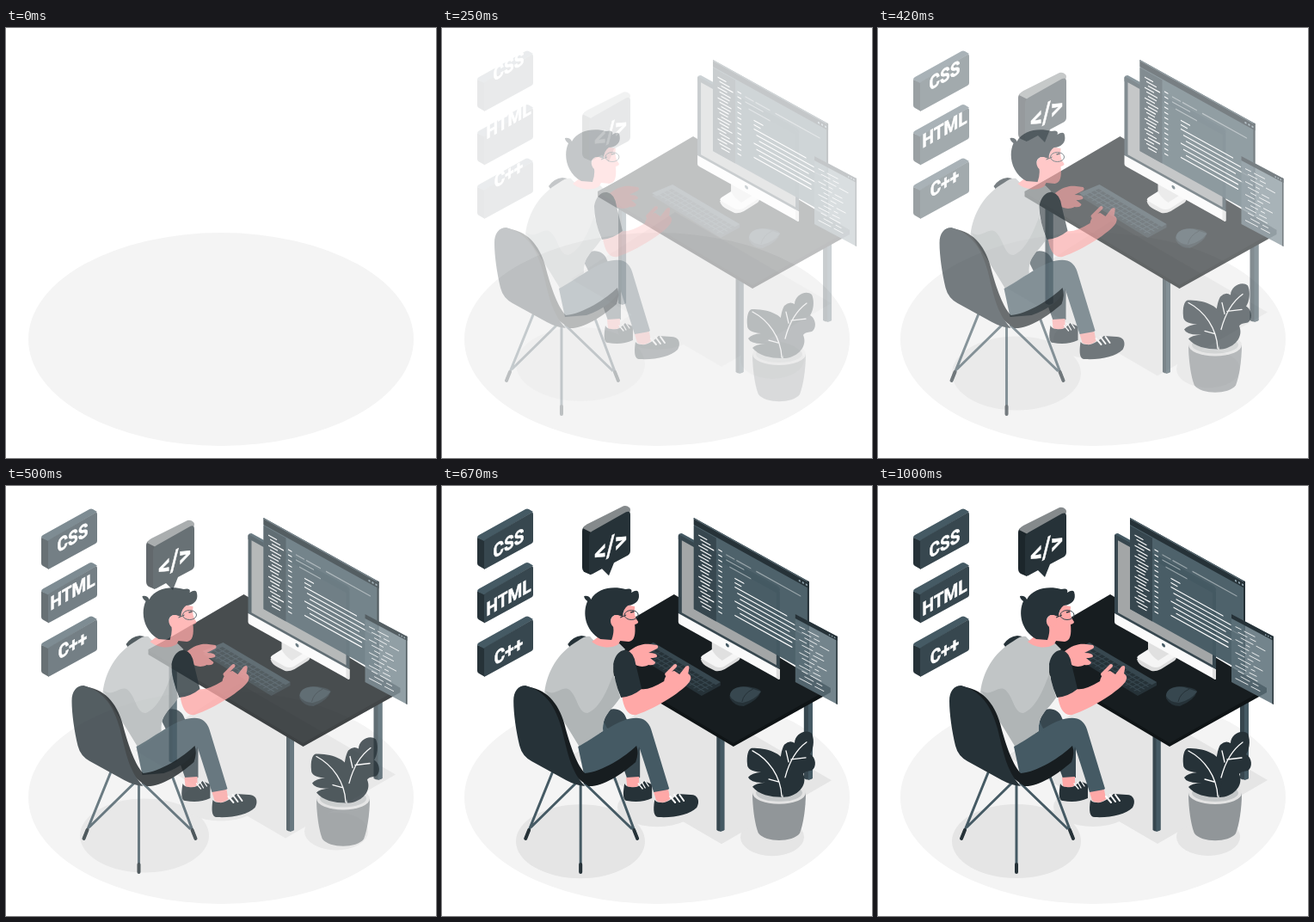
Write an HTML page that moves like this. It is 500 px wide and 500 px high and loops after 1.04 s.

```html
<!DOCTYPE html>
<html lang="en">
<head>
<meta charset="utf-8">
<title>Programmer at a desk</title>
<style>
html, body { margin: 0; width: 100%; height: 100%; overflow: hidden; background: #fff; }
svg { display: block; width: 100vw; height: 100vh; }
text { font: bold 22px Roboto, Arial, sans-serif; fill: #fff; stroke: #fff; stroke-width: .6; text-anchor: middle; }
.dark { fill: #263238; }
.mid { fill: #37474f; }
.slate { fill: #455a64; }
.black { fill: #171d20; }
.skin { fill: #ffa8a7; }
.line { fill: none; stroke: #fff; stroke-width: 1.3; stroke-linecap: round; }
</style>
</head>
<body>
<svg viewBox="0 0 500 500">
  <ellipse cx="250" cy="362" rx="224" ry="124" fill="#f4f4f4"/>

  <g data-move="0 -30" fill="#e5e5e5">
    <ellipse cx="161" cy="413" rx="75" ry="43"/>
    <ellipse cx="384" cy="408" rx="37" ry="22"/>
    <ellipse cx="250" cy="373" rx="46" ry="23"/>
    <path d="M325 416L453 342L271 236L150 314Z"/>
  </g>

  <!-- desk, monitor and code windows -->
  <g data-move="30 0">
    <path class="mid" d="M183 205h9v115q-5 3-9 0zM319.500 285h9v115q-5 3-9 0zM421 240h10v100q-5 3-10 0z"/>
    <path class="slate" d="M187 205h5v115l-5 2zM323.500 290h5v110l-5 2zM426 240h5v100l-5 2z"/>
    <path fill="#0f1416" d="M159 190L270 130L452 235V240L339 303L159 196Z"/>
    <path class="black" d="M159 191L270 126L452 235L339 299Z"/>
    <path class="dark" d="M222 195L302 244L324 232V228L246 186Z"/>
    <path class="mid" d="M222 192L246 182L324 228L302 241Z"/>
    <g id="keys" class="dark" transform="matrix(.86 .52 -.86 .42 245 185)"></g>
    <path class="dark" d="M335 247C333 238 342 232 354 233Q370 235 371 239Q368 249 351 256Q340 256 335 247Z"/>
    <path class="mid" d="M335 244C335 236 345 232 356 234L371 239Q364 249 350 252Q338 251 335 244Z"/>
    <path d="M349 251Q351 241 362 236" fill="none" stroke="#263238"/>

    <path fill="#dcdcdc" d="M301 201Q302 207 310 211L318 215Q323 216 329 213L345 203Q348 200 347 196Z"/>
    <path fill="#f5f5f5" d="M303 197L322 185Q326 183 331 185L345 193Q349 196 345 199L328 210Q323 212 318 210L304 202Q299 200 303 197Z"/>
    <path fill="#e0e0e0" d="M314 180L340 194L326 203Q318 198 314 190Z"/>
    <path fill="#455a64" d="M275 58Q275 55 279 55L390 116Q394 119 393 122L275 62Z"/>
    <g transform="matrix(1 .555 0 1 275 56)">
      <rect class="mid" width="118" height="94" rx="2"/>
      <rect x="4" y="5" width="110" height="84" fill="#a3a6a7"/>
      <path fill="#fafafa" d="M0 92H118V102Q118 104 116 104H2Q0 104 0 102Z"/>
      <path fill="#dedede" d="M114 92h4v10q0 2-2 2h-2z"/>
      <circle class="slate" cx="57" cy="97.5" r="2"/>
    </g>

    <g transform="matrix(1 .555 0 1 293 37)">
      <rect class="slate" width="134" height="106" opacity=".95"/>
      <rect class="mid" y="9" width="26" height="97"/>
      <rect class="dark" width="134" height="8"/>
      <rect width="134" height="1.5" fill="#55666e"/>
      <rect class="dark" x="132" width="2" height="106"/>
      <path d="M122 5h2m2 0h2m2 0h2" stroke="#90a4ae" stroke-width="2"/>
      <path id="mainCode" class="line"/>
      <path class="line" style="stroke:#9aa6ab" d="M38 22h9m3 0h16m7 0h51M38 28h20M42 34h24"/>
    </g>
    <g transform="matrix(1 .53 0 1 411 149)">
      <rect width="49" height="79" fill="#5d707a" opacity=".86"/>
      <rect class="dark" width="49" height="5"/>
      <rect class="dark" x="47.5" width="1.5" height="79"/>
      <path d="M39 3h1.5m1.500 0h1.500m1.500 0h1.500" stroke="#90a4ae" stroke-width="1.500"/>
      <path id="sideCode" class="line" style="stroke-width:1" opacity=".85"/>
    </g>
  </g>

  <!-- speech bubble -->
  <g data-move="0 60" data-slow>
    <path fill="#1c262b" d="M163 54Q163 50 167 48L178 56L173 105L166 102Q163 100 163 96Z"/>
    <path fill="#858a8c" d="M164 51Q165 48 169 46L211 25Q215 24 218 27Q220 29 218 33L174 56Z"/>
    <path class="dark" d="M171 61Q171 56 175 54L214 32Q219 30 219 35V77Q219 81 215 83L200 91L194 106L186 98L175 104Q171 106 171 101Z"/>
    <text transform="matrix(.866 -.5 0 1 196 82)" style="font-size:31px">&lt;/&gt;</text>
  </g>

  <!-- programmer -->
  <g data-move="-30 0">
    <path class="mid" d="M184 266C194 256 210 257 214 270L230 302V339Q223 342 215 340L201 300Z"/>
    <path class="skin" d="M214 339L229 338V348Q222 353 215 349Z"/>
    <path class="dark" d="M212 346C210 358 210 366 215 366Q231 369 244 363V347L235 343Q228 352 219 350Q214 350 212 346Z"/>
    <path class="line" d="M228 346l5 6m-1-8l4 7m0-8l4 6"/>
    <path class="skin" d="M216 193C226 185 234 183 242 184L250 185Q253 188 248 190L240 194Q250 194 250 198Q249 200 242 200L248 205Q247 209 240 208C232 212 226 209 222 206Z"/>
    <path class="dark" d="M146 184Q152 175 162 174Q172 175 176 180L150 190Z"/>
    <path fill="#c1c5c6" d="M119 240C122 216 134 194 158 180Q166 174 172 175C182 188 196 187 206 183L213 190C203 196 197 206 200 222L207 246C196 262 186 266 187 285L160 302Z"/>
    <path fill="#b0b5b6" d="M120 238C132 246 139 231 148 237C158 246 158 264 169 264C184 258 192 237 199 219L207 246C196 262 186 266 187 285L160 304Z"/>
    <path class="slate" d="M158 303C176 294 204 271 222 270Q238 268 243 283L264 352Q256 358 246 356L229 303C225 316 208 328 190 334L165 336Z"/>
    <path class="skin" d="M246 356L263 353L265 364Q257 371 249 366Z"/>
    <path class="dark" d="M247 365C245 378 246 385 252 385C270 386 288 382 296 374C300 367 298 359 289 359L274 358C268 364 261 369 254 368Q249 368 247 365Z"/>
    <path class="line" style="stroke-width:2" d="M265 361l6 7m-1-9l6 8m0-8l5 7"/>
    <path class="skin" d="M209 244L231 236Q240 238 258 227C259 221 263 216 270 215L276 219L283 210Q288 207 287 213L286 218Q291 221 288 227C282 237 250 258 226 266C216 268 211 258 209 244Z"/>
    <path d="M261 219L271 209" stroke="#ffa8a7" stroke-width="4" stroke-linecap="round"/>
    <path class="dark" d="M199 207C201 196 207 190 214 191Q223 193 225 207L232 236Q221 245 208 246Q199 225 199 207Z"/>
    <path class="skin" d="M212 138L224 140C223 151 225 153 228 158Q228 160 224 161C225 172 224 180 217 181L207 180L205 184C196 190 182 188 174 181L186 172L196 166C193 155 199 148 206 150Q212 152 212 138Z"/>
    <path class="dark" d="M169 134C163 147 166 168 184 178L197 179Q200 171 199 164C193 158 196 149 204 150L210 152Q210 143 216 139C226 138 231 132 228 123Q226 120 220 124Q222 118 213 120C198 116 180 119 173 132Q171 127 165 128Q165 131 169 134Z"/>
    <path class="skin" d="M197 154Q200 148 206 151Q209 156 206 164Q198 165 197 154Z"/>
    <path d="M207 153L214 150" stroke="#263238"/>
    <ellipse cx="220" cy="150" rx="8" ry="5.500" fill="none" stroke="#37474f"/>
    <path d="M219 147l4-1" stroke="#263238" stroke-width="1.500"/>
  </g>

  <!-- chair -->
  <g data-move="-30 0">
    <path d="M129 331L97 410M156 345L103 397M161 346V449M165 345L221 399M200 338L227 410" fill="none" stroke="#455a64" stroke-width="3"/>
    <path d="M101 400L97 410M161 440V449M223 400L227 410" stroke="#263238" stroke-width="4" stroke-linecap="round"/>
    <path class="black" d="M96 233C121 235 135 252 142 276C149 304 158 326 166 334C185 333 214 314 226 302Q229 310 225 321C208 336 186 350 170 349C140 330 110 280 96 233Z"/>
    <path class="dark" d="M83 250C83 239 88 232 97 232C121 239 132 257 139 282C146 310 149 331 166 349Q155 348 144 342L104 320Q93 314 90 302C86 285 83 265 83 250Z"/>
  </g>

  <!-- plant -->
  <g data-move="0 30">
    <path fill="#919699" d="M361 357C361 378 365 398 368 404C376 415 408 415 416 404C420 394 423 375 423 357Z"/>
    <ellipse cx="392" cy="357" rx="31" ry="13" fill="#e3e3e3"/>
    <ellipse cx="392" cy="357" rx="27" ry="10" fill="#c4c7c8"/>
    <path class="dark" d="M397 362C391 338 392 311 398 301Q404 295 410 299C410 289 423 282 430 288C434 297 431 308 428 312C435 316 436 327 430 331Q421 332 420 335C426 349 412 362 397 362Z"/>
    <path class="dark" d="M360 305C378 305 396 310 400 325C402 341 398 354 395 362C382 362 368 359 361 350Q364 346 376 345Q359 346 356 339Q360 334 371 333Q355 332 355 324C354 314 356 306 360 305Z"/>
    <path class="line" d="M361 308C380 318 394 338 395 361M380 341L391 344M424 298C413 306 404 320 399 339M403 321L400 308M406 318L423 316"/>
  </g>

  <g id="tags"></g>
</svg>
<script>
const $ = id => document.getElementById(id);

$('tags').innerHTML = ['CSS', 'HTML', 'C++'].map((label, i) => `
  <g transform="translate(0 ${i * 62.5})">
    <g data-move="0 0" data-slow>
      <path class="dark" d="M41 60L50 63V97L43 93Q41 92 41 90Z"/>
      <path class="slate" d="M41 60Q41 58 43 57L97 27Q99 26 101 27L106 30L49 64Z"/>
      <path class="mid" d="M49 65Q49 63 51 62L104 31Q106 30 106 33V64Q106 66 104 67L51 96Q49 97 49 95Z"/>
    </g>
    <g data-move="0 -30" data-solid><text transform="matrix(.866 -.5 0 1 77.500 74)">${label}</text></g>
  </g>`).join('');

const rows = (count, row) => Array.from({ length: count }, (_, i) => row(i)).join('');

$('keys').innerHTML = rows(60, i =>
  `<rect x="${i % 15 * 5.9 + 2}" y="${Math.floor(i / 15) * 5.8 + 2}" width="4.700" height="4.300"/>`);

const wobble = i => i * 7 % 5;
$('mainCode').setAttribute('d',
  rows(21, i => `M${6 + i % 3 * 2} ${17 + i * 4}h${9 + wobble(i)}`) +
  rows(13, i => `M29 ${21 + i * 6}h3.500`) +
  'M48 44h10M48 49h7' +
  rows(7, i => `M${48 + i % 3 * 3} ${54 + i * 5.5}h${60 + wobble(i) * 3}`));
$('sideCode').setAttribute('d',
  rows(13, i => `M${5 + i % 3 * 3} ${12 + i * 5}h${6 + wobble(i) * 2}m4 0h${4 + wobble(i + 2) * 2}`));

// Cubic Bezier easing, solved by bisection
function bezier(x1, y1, x2, y2) {
  const at = (s, a, b) => 3 * (1 - s) ** 2 * s * a + 3 * (1 - s) * s * s * b + s ** 3;
  return x => {
    let low = 0, high = 1;
    for (let i = 0; i < 24; i++) {
      const s = (low + high) / 2;
      if (at(s, x1, x2) < x) low = s; else high = s;
    }
    return at(high, y1, y2);
  };
}

const LOOP = 1040, FPS = 24;
const quick = bezier(.36, -.01, .5, 1.38);
const slow = bezier(.42, -.15, .5, 1.5);
const parts = [...document.querySelectorAll('[data-move]')].map(el => ({
  el,
  offset: el.dataset.move.split(' ').map(Number),
  isSlow: 'slow' in el.dataset,
  solid: 'solid' in el.dataset
}));

function draw(now) {
  const step = Math.floor((now % LOOP + 4) / 1000 * FPS);
  const time = step < 2 ? 0 : Math.min(1, (step + .5) / FPS);
  for (const { el, offset: [dx, dy], isSlow, solid } of parts) {
    const p = (isSlow ? slow : quick)(time);
    const shown = Math.max(0, Math.min(1, p));
    el.setAttribute('transform', `translate(${dx * (1 - p)} ${dy * (1 - p)})`);
    el.setAttribute('opacity', solid ? 1 : isSlow ? shown ** 1.3 : shown);
  }
}

const start = performance.now();
function tick() {
  draw(performance.now() - start);
  requestAnimationFrame(tick);
}
tick();
</script>
</body>
</html>
```
